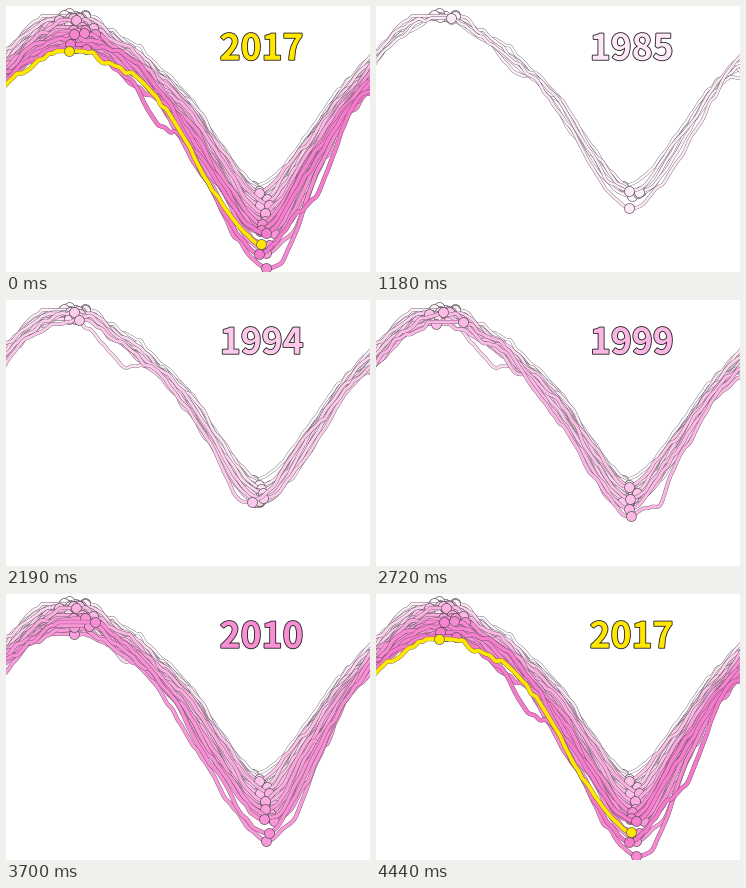
Write a matplotlib script that moves like this. It is 364 by 266 pixels and loops after 7740 ms.

```python
import numpy as np
import matplotlib.pyplot as plt
from matplotlib.animation import FuncAnimation
from matplotlib.patheffects import withStroke

W, H, DPI = 364, 266, 64
PT = 72 / DPI
STEP, LOOP = 10, 7740
FIRST, LAST = 1979, 2017
INK = "#4a444a"
YEARS = np.arange(FIRST, LAST + 1)

# Mean yearly cycle in the first years
CYCLE = [(-6, 54), (20, 30), (45, 15), (65, 12), (85, 17), (130, 44), (160, 71),
         (185, 103), (235, 181), (253, 194), (270, 186), (300, 139), (345, 73), (370, 50)]

# Notable years: peak x, y and low x, y
NOTABLE = {
    1980: (63, 7, 247, 180), 1985: (75, 12, 253, 202), 1989: (63, 19, 257, 193),
    1996: (53, 14, 253, 187), 1999: (87, 22, 255, 216), 2001: (70, 14, 263, 199),
    2005: (68, 34, 265, 224), 2006: (68, 40, 259, 215), 2007: (68, 33, 260, 247),
    2010: (89, 28, 263, 239), 2012: (78, 27, 260, 262), 2016: (80, 43, 253, 248),
    2017: (63, 45, 255, 238),
}

# Local dips below a year's usual course: centre, half width, depth
DIPS = {
    1989: [(115, 16, 14)], 1999: [(284, 9, 16)], 2006: [(322, 10, 22)],
    2007: [(292, 12, 14)], 2012: [(290, 18, 14)],
    2016: [(146, 22, 20), (314, 18, 18)], 2017: [(22, 14, 6), (200, 24, 13)],
}

CUES = {1979: 540, 1985: 1180, 1989: 1650, 1999: 2720, 2010: 3700, 2017: 4440}
STARTS = np.round(np.interp(YEARS, list(CUES), list(CUES.values())), -1)

x = np.arange(-6, 371.0)
rng = np.random.default_rng(12)


def smooth(v, sigma):
    n = int(3 * sigma) + 1
    k = np.exp(-0.5 * (np.arange(-n, n + 1) / sigma) ** 2)
    return np.convolve(np.pad(v, n, mode="edge"), k / k.sum(), "valid")


def bell(centre, width):
    return np.exp(-((x - centre) / width) ** 2)


def wiggle(sigma, size):
    v = smooth(rng.normal(size=x.size), sigma)
    return size * (v - v.mean()) / v.std()


cycle = smooth(np.interp(x, *zip(*CYCLE)), 5)
age = (YEARS - FIRST) / (LAST - FIRST)
edge = 27 * np.append(age, 1) ** 1.2 + np.append(rng.normal(0, 4, YEARS.size - 1), [0, 0])


def extremes(i):
    """Peak and low of a year: known, or the trend with some scatter."""
    px, lx = rng.normal((68, 256), (7, 5))
    py = max(4, 8 + 30 * age[i] ** 1.2 + rng.normal(0, 4))
    ly = max(182, 188 + 48 * age[i] ** 1.4 + rng.normal(0, 5))
    px, py, lx, ly = NOTABLE.get(YEARS[i], (px, py, lx, ly))
    return (px, py), (lx, ly)


def year_curve(i):
    peak, low = extremes(i)
    calm = 0.3 if YEARS[i] == LAST else 1
    # Shift the valley of the mean cycle to this year's low
    base = np.interp(x - (low[0] - 254) * bell(low[0], 40), x, cycle)
    drop_max = peak[1] - np.interp(peak[0], x, base)
    drop_min = low[1] - np.interp(low[0], x, base)
    jitter = calm * rng.normal(0, 4, 3)
    anchors = [
        (0, edge[i]),
        (peak[0], drop_max),
        (135, 25 * age[i] ** 0.9 + jitter[0]),
        (185, 0.72 * drop_min + jitter[1]),
        (low[0], drop_min),
        (300, 0.75 * drop_min + jitter[2]),
        (364, edge[i + 1]),
    ]
    y = base + smooth(np.interp(x, *zip(*anchors)), 4)
    y += calm * wiggle(9, 2.6) + wiggle(2.5, 1.2) * (1 - bell(low[0], 14))
    for centre, width, depth in DIPS.get(YEARS[i], []):
        y += depth * bell(centre, width)
    for px, py in (peak, low):
        y += (py - np.interp(px, x, y)) * bell(px, 12)
    return np.clip(y, peak[1], low[1]), peak, low


def year_color(i):
    if YEARS[i] == LAST:
        return (1.0, 0.905, 0.0)
    return tuple(1 - age[i] * (1 - np.array([246, 118, 203]) / 255))


fig = plt.figure(figsize=(W / DPI, H / DPI), dpi=DPI, facecolor="white")
ax = fig.add_axes([0, 0, 1, 1])


def reset_axes():
    ax.clear()
    ax.set_xlim(0, W)
    ax.set_ylim(H, 0)
    ax.axis("off")


def draw_year(i):
    y, peak, low = year_curve(i)
    color = year_color(i)
    width = 2.4 + 1.5 * age[i]
    shown = x <= (low[0] if YEARS[i] == LAST else x[-1])
    z = 2 + i
    ax.plot(x[shown], y[shown], color=color, lw=width * PT, zorder=z,
            solid_joinstyle="round", solid_capstyle="round",
            path_effects=[withStroke(linewidth=(width + 0.55) * PT, foreground=INK)])
    ax.plot(*zip(peak, low), "o", ms=10 * PT, mfc=color, mec=INK, mew=0.6 * PT, zorder=z + 0.5)


def snapshots():
    """Add the years one by one and keep the picture after each."""
    reset_axes()
    label = ax.text(255.5, 53.8, "", family="Noto Sans CJK JP", weight="bold", size=35.5 * PT,
                    ha="center", va="baseline", zorder=99,
                    path_effects=[withStroke(linewidth=1.7 * PT, foreground="#201c20")])
    shots = []
    for i, year in enumerate(YEARS):
        draw_year(i)
        label.set_text(str(year))
        label.set_color(year_color(i))
        fig.canvas.draw()
        shots.append(np.array(fig.canvas.buffer_rgba()))
    return shots


shots = snapshots()
reset_axes()
picture = ax.imshow(shots[-1], extent=(0, W, H, 0), aspect="auto", interpolation="nearest")


def update(n):
    # Before the first cue the index is -1: the finished chart
    picture.set_data(shots[np.searchsorted(STARTS, n * STEP, side="right") - 1])
    return (picture,)


anim = FuncAnimation(fig, update, frames=LOOP // STEP, interval=STEP,
                     repeat=True, repeat_delay=0, blit=False)
plt.show()
```
